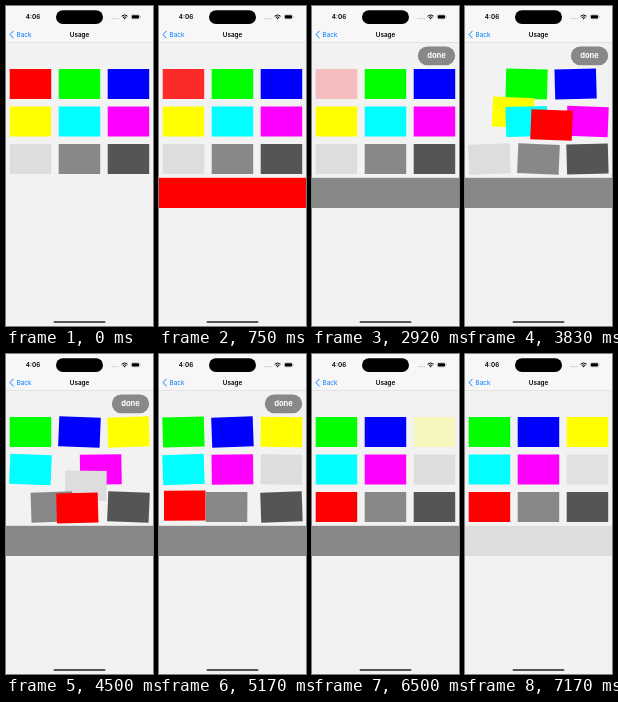
These frames come from a looping animation (147 px wide and 320 px high, 7330 ms). An HTML page:

```html
<!DOCTYPE html>
<html lang="en">
<head>
<meta charset="utf-8">
<title>Sortable grid</title>
<style>
  html, body { margin: 0; width: 100%; height: 100%; overflow: hidden; background: #f2f2f2; }
  svg { display: block; width: 100vw; height: 100vh; }
  text { font-family: Inter, sans-serif; font-size: 6.35px; }
</style>
</head>
<body>
<svg viewBox="0 0 147 320" preserveAspectRatio="none">
  <rect width="147" height="320" fill="#f2f2f2"/>
  <rect width="147" height="36.6" fill="#f7f7f7"/>
  <rect y="36.4" width="147" height=".5" fill="#d0d0d2"/>

  <text x="27" y="13.3" text-anchor="middle" font-weight="600">4:06</text>
  <rect x="50" y="4.2" width="47" height="13.8" rx="6.9"/>
  <g fill="#b4b4b4">
    <circle cx="106.2" cy="12.6" r=".6"/><circle cx="108.2" cy="12.6" r=".6"/>
    <circle cx="110.2" cy="12.6" r=".6"/><circle cx="112.2" cy="12.6" r=".6"/>
  </g>
  <g fill="none" stroke="#000" stroke-width="1">
    <path d="M115.6 10.2Q118.6 7.6 121.6 10.2M116.8 11.6Q118.6 10.1 120.4 11.6"/>
  </g>
  <path d="M117.6 12.4Q118.6 11.7 119.6 12.4L118.6 13.5Z"/>
  <rect x="125.2" y="8.6" width="8.4" height="4.4" rx="1.4" fill="none" stroke="#999" stroke-width=".4"/>
  <rect x="125.8" y="9.2" width="7.2" height="3.2" rx=".9"/>
  <rect x="134" y="10" width=".5" height="1.6" rx=".25" fill="#999"/>

  <path d="M7.2 25.2L4 28.6L7.2 32" fill="none" stroke="#007aff" stroke-width=".95" stroke-linecap="round" stroke-linejoin="round"/>
  <text x="10.6" y="30.9" fill="#007aff">Back</text>
  <text x="73.5" y="30.9" text-anchor="middle" font-weight="600">Usage</text>

  <rect id="panel" y="171.8" width="147" height="30.2"/>
  <g id="cells"></g>
  <g id="done">
    <rect x="105.8" y="40.4" width="37.4" height="18.8" rx="9.4" fill="#888"/>
    <text x="124.5" y="52.4" text-anchor="middle" fill="#fff" font-weight="700" style="font-size:7.6px">done</text>
  </g>
  <rect x="47.5" y="315" width="52" height="1.9" rx=".95" fill="#555"/>
</svg>
<script>
const LOOP = 7330, STEP = 1000 / 12;
const W = 41.5, H = 30;
const EDIT = { from: 2915, to: 5995 };
const colors = ['#f00', '#0f0', '#00f', '#ff0', '#0ff', '#f0f', '#ddd', '#888', '#555'];
const phases = [100, 140, 220, 80, 220, 115, -60, 90, 220];

// press and release times; a tap sets the panel colour on release
const presses = [
  { cell: 0, down: 495, up: 583, tap: true },
  { cell: 4, down: 1080, up: 1167, tap: true },
  { cell: 7, down: 1580, up: 1667, tap: true },
  { cell: 0, down: 2415, up: 2917 },
  { cell: 3, down: 6495, up: 6583, tap: true },
  { cell: 6, down: 6915, up: 7000, tap: true }
];

// slot taken by the dragged red cell over time
const moves = [{ at: 0, slot: 0 }, { at: 3729, slot: 4 }, { at: 4340, slot: 7 }, { at: 4940, slot: 6 }];

const drag = [
  [3080, 3.7, 63], [3833, 65.8, 104], [4450, 51, 139], [5167, 5, 136.6], [5330, 3.7, 138]
];

const $ = id => document.getElementById(id);
const clamp = u => Math.max(0, Math.min(1, u));
const ease = u => (u = clamp(u), u < .5 ? 2 * u * u : 1 - 2 * (1 - u) ** 2);
const mix = (a, b, u) => a + (b - a) * u;
const slotPos = s => [3.7 + 49 * (s % 3), 63 + 37.5 * Math.floor(s / 3)];

const cells = colors.map(fill => {
  const r = document.createElementNS('http://www.w3.org/2000/svg', 'rect');
  r.setAttribute('width', W);
  r.setAttribute('height', H);
  r.setAttribute('fill', fill);
  return r;
});
[...cells.slice(1), cells[0]].forEach(r => $('cells').append(r));

// the others close ranks around the dragged cell
const slotOf = (i, redSlot) => i <= redSlot ? i - 1 : i;

function dragPos(t) {
  const k = drag.findIndex(p => p[0] > t);
  if (k === 0) return drag[0].slice(1);
  if (k < 0) return drag[drag.length - 1].slice(1);
  const a = drag[k - 1], b = drag[k];
  const u = ease((t - a[0]) / (b[0] - a[0]));
  return [mix(a[1], b[1], u), mix(a[2], b[2], u)];
}

function cellPos(i, t) {
  if (i === 0) return dragPos(t);
  const k = moves.findLastIndex(m => m.at <= t);
  const to = slotPos(slotOf(i, moves[k].slot));
  if (k === 0) return to;
  const from = slotPos(slotOf(i, moves[k - 1].slot));
  const u = ease((t - moves[k].at) / 300);
  return [mix(from[0], to[0], u), mix(from[1], to[1], u)];
}

function wiggle(i, t) {
  if (t < EDIT.from || t >= EDIT.to) return 0;
  const turn = (t - 3833) / 255 * 360 + phases[i];
  return 2.4 * clamp((t - 2917) / 80) * Math.sin(turn * Math.PI / 180);
}

function cellOpacity(i, t) {
  const p = presses.findLast(p => p.cell === i && p.down <= t);
  return p ? mix(.22, 1, ease((t - p.up) / 250)) : 1;
}

function render(time) {
  const t = Math.floor((time % LOOP + 5) / STEP) * STEP;
  cells.forEach((r, i) => {
    const [x, y] = cellPos(i, t);
    r.setAttribute('transform', `translate(${x} ${y}) rotate(${wiggle(i, t)} ${W / 2} ${H / 2})`);
    r.setAttribute('opacity', cellOpacity(i, t));
  });
  const last = presses.findLast(p => p.tap && p.up <= t + 1);
  $('panel').setAttribute('fill', last ? colors[last.cell] : 'none');
  const editing = t >= EDIT.from && t < EDIT.to;
  $('done').setAttribute('opacity', !editing ? 0 : t > 5900 ? .25 : 1);
}

const start = performance.now();
function tick() {
  render(performance.now() - start);
  requestAnimationFrame(tick);
}
tick();
</script>
</body>
</html>
```
